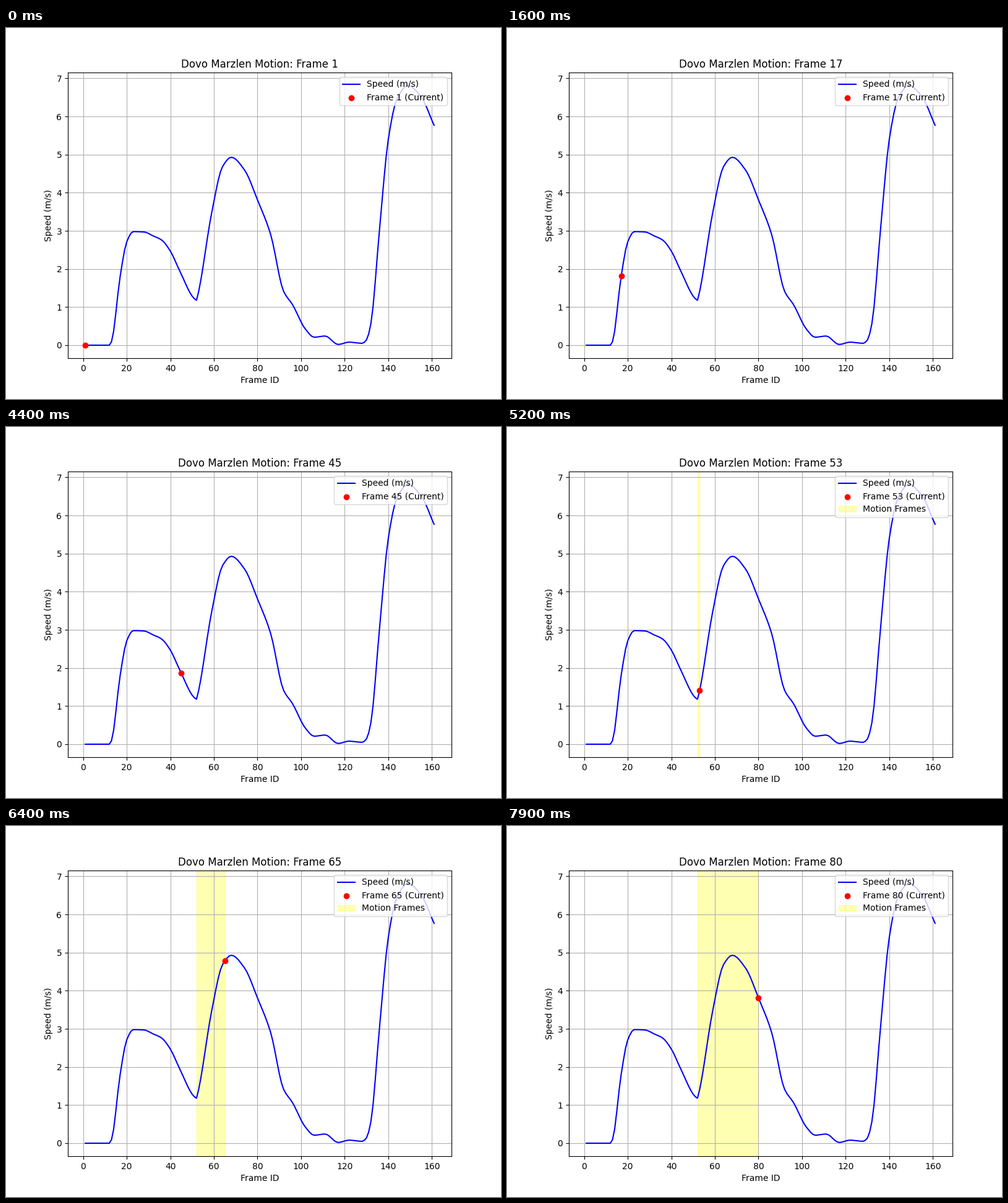
A matplotlib script for the animation above (8 s loop, 800 by 600 pixels).

```python
import matplotlib.pyplot as plt
import numpy as np
from matplotlib.animation import FuncAnimation

FRAMES = 80
MOTION_START = 52
PLAYER = "Dovo Marzlen"

# Turning points (frame id, speed) of the three runs
RUNS = np.array([
    (1, 0), (12, 0), (13, .09), (17, 1.81), (20, 2.71), (23, 2.98),
    (28, 2.97), (32, 2.87), (36, 2.76), (40, 2.47), (44, 1.99), (51, 1.22),
    (52, 1.18), (53, 1.41), (59, 3.48), (64, 4.69), (68, 4.93), (74, 4.6),
    (80, 3.81), (86, 2.91), (92, 1.41), (96, 1.07), (102, .42), (106, .21),
    (111, .24), (117, .02), (122, .08), (128, .05), (130, .14), (132, .56),
    (136, 3.05), (140, 5.4), (144, 6.46), (149, 6.813), (155, 6.52),
    (161, 5.77),
])


def monotone_curve(x, kx, ky):
    """Cubic through the knots that never overshoots them."""
    h = np.diff(kx)
    d = np.diff(ky) / h
    a, b = d[:-1], d[1:]
    wa, wb = h[:-1] + 2 * h[1:], 2 * h[:-1] + h[1:]
    same = a * b > 0
    blend = np.where(same, wa * b + wb * a, 1)
    inner = np.where(same, (wa + wb) * a * b / blend, 0)
    m = np.concatenate([d[:1], inner, d[-1:]])

    i = np.clip(np.searchsorted(kx, x, side="right") - 1, 0, len(h) - 1)
    t = (x - kx[i]) / h[i]
    s = 1 - t
    return (s * s * ((1 + 2 * t) * ky[i] + t * h[i] * m[i])
            + t * t * ((1 + 2 * s) * ky[i + 1] - s * h[i] * m[i + 1]))


ids = np.arange(1, 162)
speed = monotone_curve(ids, *RUNS.T)

fig, ax = plt.subplots(figsize=(8, 6), dpi=100)
line, = ax.plot(ids, speed, color="blue", label="Speed (m/s)")
dot = ax.scatter(ids[:1], speed[:1], color="red", zorder=5)
band = ax.axvspan(MOTION_START, MOTION_START, color="yellow", alpha=0.3,
                  label="Motion Frames")
top = speed.max()
ax.set(xlim=(-7, 169), ylim=(-0.05 * top, 1.05 * top),
       xlabel="Frame ID", ylabel="Speed (m/s)")
ax.grid(True)


def update(k):
    n = ids[k]
    moving = n >= MOTION_START
    dot.set_offsets([(n, speed[k])])
    dot.set_label(f"Frame {n} (Current)")
    band.set_visible(moving)
    band.set_width(max(n - MOTION_START, 0))
    ax.set_title(f"{PLAYER} Motion: Frame {n}")
    ax.legend(handles=[line, dot] + ([band] if moving else []),
              loc="upper right")
    return []


anim = FuncAnimation(fig, update, frames=FRAMES, interval=100,
                     init_func=lambda: update(0), repeat=True, repeat_delay=0)
plt.show()
```
